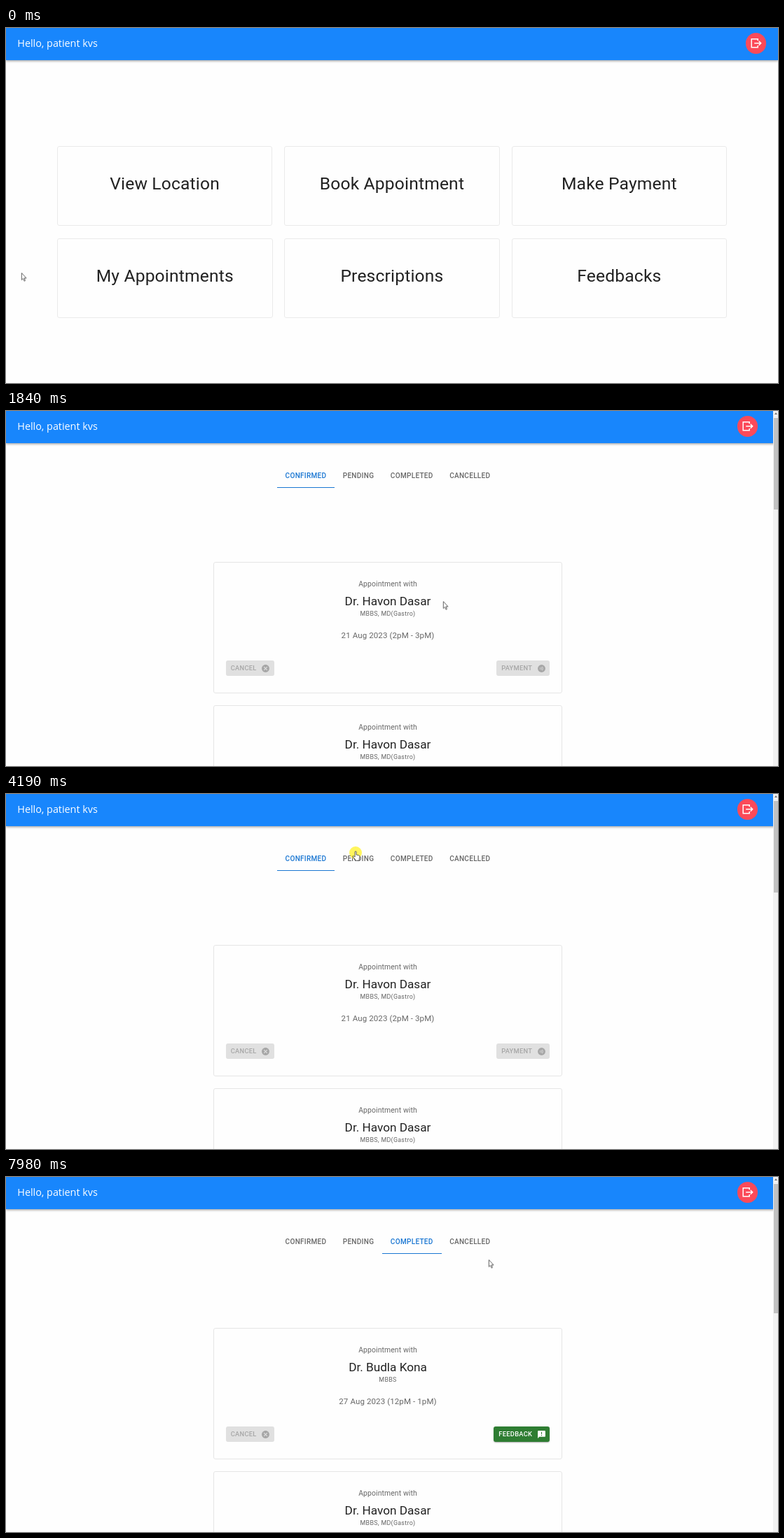
These frames come from a looping animation (1102x508 px, 8 s). An HTML page:

```html
<!DOCTYPE html>
<html lang="en">
<head>
<meta charset="utf-8">
<title>Patient portal</title>
<style>
@property --y { syntax: "<length>"; inherits: true; initial-value: 0px; }
@property --bar { syntax: "<number>"; inherits: true; initial-value: 0; }

html, body { margin: 0; width: 100%; height: 100%; overflow: hidden; }
#stage { position: relative; width: 1102px; height: 508px; overflow: hidden; background: #fefefe;
  font-family: Roboto, sans-serif; color: rgba(0,0,0,.87); }
#stage * { position: absolute; box-sizing: border-box; margin: 0; white-space: nowrap; }
.loop { animation: 8s step-end infinite; }
.fill { inset: 0; }
#stage { animation-name: scroll, bar; }
#page { transform: translateY(calc(-1 * var(--y))); }

header { width: 1102px; height: 46px; background: #1886fc; box-shadow: 0 1.5px 3px rgba(0,0,0,.35); }
header p { left: 16.3px; line-height: 44px; font: 14.35px/44px "Open Sans", sans-serif; color: #fff; }
#logout { left: 1055.8px; top: 7.3px; width: 29.4px; height: 29.4px; border-radius: 50%; background: #fb4a59;
  transform: translateX(calc(var(--bar) * -12px)); }
#logout svg { left: 0; top: 0; fill: none; stroke: #fff; stroke-width: 1.5; }

.tile { width: 307.5px; height: 114px; border: 1px solid #eaeaea; border-radius: 3px; background: #fefefe;
  font-size: 24.6px; line-height: 106px; letter-spacing: .18px; text-align: center; }

#tabs { left: 393px; top: 75px; transform: translateX(calc(var(--bar) * -6px)); }
.tab { height: 35px; overflow: hidden; text-align: center; font-size: 10.04px; font-weight: 500; line-height: 35px;
  letter-spacing: .287px; color: rgba(0,0,0,.6); }
.tab i { left: 50%; top: 50%; width: 90px; height: 90px; margin: -45px; border-radius: 50%; background: #1976d2; opacity: 0; }
#line { top: 33.6px; height: 1.4px; background: #1976d2; }

.card { height: 188px; border: 1px solid #e6e6e6; border-radius: 3px; background: #fefefe; }
.card p { left: 0; width: 100%; text-align: center; line-height: 20px; color: rgba(0,0,0,.6); }
.card .lead { top: 21.5px; font-size: 10.4px; letter-spacing: .11px; }
.card .name { top: 45px; font-size: 17.2px; color: rgba(0,0,0,.87); }
.card .degree { top: 63px; font-size: 8.9px; letter-spacing: .3px; }
.card .date { top: 94px; font-size: 11.5px; letter-spacing: .11px; }
.btn { top: 140px; height: 22.4px; padding-left: 7px; border-radius: 3px; font-size: 9.33px; font-weight: 500;
  line-height: 22px; letter-spacing: .267px; color: #fff; background: var(--bg);
  box-shadow: 0 1.5px 1px -1px rgba(0,0,0,.2), 0 1px 2px rgba(0,0,0,.25); }
.btn.off { color: #a6a6a6; box-shadow: none; }
.btn svg { right: 5.5px; top: 4.8px; width: 13px; height: 13px; fill: currentColor; }
.btn .waves { fill: none; stroke: var(--bg); stroke-width: 1.6; }

.scrollbar { right: 0; top: 0; width: 7px; height: 508px; background: #f1f1f1; }
.scrollbar b { left: 1px; right: 0; top: 9.5px; background: #c1c1c1; }
.scrollbar u { left: 2px; top: 2px; border: 2.5px solid transparent; border-top: 0; border-bottom: 3px solid #777; }

#veil { background: radial-gradient(circle 607px at 551px 254px, rgba(255,255,255,.85), rgba(238,238,238,.57) 41%, rgba(184,184,184,.38) 91%); }
.dot { top: 265.3px; width: 5px; height: 5px; border-radius: 50%;
  animation: bob 1s cubic-bezier(.37,0,.63,1) infinite alternate, near 1s cubic-bezier(.37,0,.63,1) infinite alternate; }

#cursor svg { left: 0; top: 0; overflow: visible; fill: #fff; stroke: #3a3a3a; stroke-width: .8; stroke-linejoin: round; }
#click { left: -9px; top: -7.5px; width: 18px; height: 18px; border-radius: 50%; background: rgba(255,242,40,.75); }

@keyframes scroll {
  0% { --y: 0px; }
  29.125% { --y: 0px; animation-timing-function: steps(3, jump-both); }
  31.625% { --y: 243px; }
  32.5% { --y: 243px; animation-timing-function: steps(1, jump-both); }
  33.375% { --y: 275px; }
  34.25% { --y: 275px; animation-timing-function: steps(5, jump-both); }
  38.75% { --y: 0px; }
  83.75% { --y: 0px; animation-timing-function: steps(3, jump-both); }
  86.25% { --y: 249px; }
  90.375% { --y: 249px; animation-timing-function: steps(5, jump-both); }
  94.75%, 100% { --y: 0px; }
}
@keyframes bar { 0%, 53.25% { --bar: 0; } 21.375%, 72.625%, 100% { --bar: 1; } }
@keyframes home { 0% { opacity: 1; } 13.875%, 100% { opacity: 0; } }
@keyframes visits { 0% { opacity: 0; } 13.875%, 100% { opacity: 1; } }
@keyframes veil { 0%, 21.375%, 100% { opacity: 0; } 13.875% { opacity: 1; } }
@keyframes confirmed { 0%, 53.25%, 100% { opacity: 0; } 21.375% { opacity: 1; } }
@keyframes pending { 0%, 72.625%, 100% { opacity: 0; } 53.25% { opacity: 1; } }
@keyframes completed { 0% { opacity: 0; } 72.625%, 100% { opacity: 1; } }
@keyframes tab0 { 0% { color: #1976d2; } 53.25%, 100% { color: rgba(0,0,0,.6); } }
@keyframes tab1 { 0%, 72.625%, 100% { color: rgba(0,0,0,.6); } 53.25% { color: #1976d2; } }
@keyframes tab2 { 0% { color: rgba(0,0,0,.6); } 72.625%, 100% { color: #1976d2; } }
@keyframes ripple1 {
  0%, 53.24% { opacity: 0; scale: .2; }
  53.25% { opacity: .1; scale: .2; animation-timing-function: ease-out; }
  57.5% { opacity: .1; scale: 1; animation-timing-function: linear; }
  61.875%, 100% { opacity: 0; scale: 1; }
}
@keyframes ripple2 {
  0%, 72.62% { opacity: 0; scale: .2; }
  72.625% { opacity: .1; scale: .2; animation-timing-function: ease-out; }
  76.5% { opacity: .1; scale: 1; animation-timing-function: linear; }
  80.375%, 100% { opacity: 0; scale: 1; }
}
@keyframes line {
  0% { left: 0; width: 82px; }
  53.25% { left: 0; width: 82px; animation-timing-function: steps(4, jump-both); }
  56.75% { left: 82px; width: 68px; }
  72.625% { left: 82px; width: 68px; animation-timing-function: steps(4, jump-both); }
  76.125%, 100% { left: 150px; width: 84.5px; }
}
@keyframes hover {
  0% { scale: 1; }
  7% { scale: 1; animation-timing-function: steps(3, jump-both); }
  9.5%, 100% { scale: 1.03; }
}
@keyframes move {
  0% { translate: 22px 350.5px; }
  6.125% { translate: 22px 350.5px; animation-timing-function: steps(4, jump-both); }
  9.5% { translate: 182px 357.5px; }
  20.5% { translate: 182px 357.5px; animation-timing-function: steps(3, jump-both); }
  23% { translate: 624px 272.5px; }
  41.125% { translate: 624px 272.5px; animation-timing-function: steps(4, jump-both); }
  44.625% { translate: 499px 66.5px; }
  47.125% { translate: 499px 66.5px; animation-timing-function: steps(2, jump-both); }
  48.875% { translate: 499px 82px; }
  63.5% { translate: 499px 82px; animation-timing-function: steps(5, jump-both); }
  67.625% { translate: 594px 97.5px; }
  77.875% { translate: 594px 97.5px; animation-timing-function: steps(3, jump-both); }
  80.375% { translate: 615px 325px; }
  98% { translate: 615px 325px; animation-timing-function: steps(2, jump-both); }
  99.75%, 100% { translate: 689px 118.5px; }
}
@keyframes arrow { 0%, 13.875%, 77.875%, 100% { opacity: 1; } 7%, 48% { opacity: 0; } }
@keyframes hand { 0%, 13.875%, 77.875%, 100% { opacity: 0; } 7%, 48% { opacity: 1; } }
@keyframes click { 0%, 13.875%, 55%, 74.375%, 100% { opacity: 0; } 12.125%, 52.375%, 71.75% { opacity: 1; } }
@keyframes bob { from { translate: 0 -14.6px; } to { translate: 0 14.6px; } }
@keyframes near { from { scale: .6; background: var(--far); } to { scale: 1.16; background: var(--hue); } }
</style>
</head>
<body>
<div id="stage" class="loop">
  <div id="page" class="fill">
    <div id="home" class="fill loop" style="animation-name:home"></div>
    <div id="visits" class="fill loop" style="animation-name:visits">
      <div id="tabs"><div id="line" class="loop" style="animation-name:line"></div></div>
    </div>
    <header>
      <p>Hello, patient kvs</p>
      <div id="logout"><svg width="29.4" height="29.4" viewBox="-14.7 -14.7 29.4 29.4"><path d="M2.5-3.4V-6H-6.5V6H2.5V3.4M-2.5 0H6.8M4-3 7 0 4 3"/></svg></div>
    </header>
  </div>
  <div id="veil" class="fill loop" style="animation-name:veil"></div>
  <div id="cursor" class="loop" style="animation-name:move">
    <div id="click" class="loop" style="animation-name:click"></div>
    <svg class="loop" style="animation-name:arrow" width="9" height="13"><path d="M.3 0V10L2.5 8 4 11.6 5.5 11 4 7.4H7Z"/></svg>
    <svg class="loop" style="animation-name:hand" width="9" height="15"><path d="M-.9 8V1A1 1 0 0 1 1.1 1V5L4.8 5.8Q6.2 6.3 6 8L5.2 11V13.3H-.4V11.7L-3.9 7.8Q-3.6 6.2-2.3 7Z"/></svg>
  </div>
</div>
<script>
const $ = id => document.getElementById(id);
const add = (id, html) => $(id).insertAdjacentHTML('beforeend', html);

['View Location', 'Book Appointment', 'Make Payment', 'My Appointments', 'Prescriptions', 'Feedbacks'].forEach((label, i) => {
  const hover = i === 3 ? 'animation-name:hover;' : '';
  add('home', `<div class="tile loop" style="${hover}left:${72.8 + i % 3 * 324.4}px;top:${169.3 + (i > 2) * 131.3}px">${label}</div>`);
});

[['CONFIRMED', 0, 82], ['PENDING', 82, 68], ['COMPLETED', 150, 84.5], ['CANCELLED', 234.5, 81.5]].forEach(([label, left, width], i) => {
  const ripple = i % 3 ? `<i class="loop" style="animation-name:ripple${i}"></i>` : '';
  add('tabs', `<div class="tab loop" style="animation-name:tab${i};left:${left}px;width:${width}px">${label}${ripple}</div>`);
});

const icons = {
  CANCEL: '<path d="M12 2C6.47 2 2 6.47 2 12s4.47 10 10 10 10-4.47 10-10S17.53 2 12 2zm5 13.59L15.59 17 12 13.41 8.41 17 7 15.59 10.59 12 7 8.41 8.41 7 12 10.59 15.59 7 17 8.41 13.41 12 17 15.59z"/>',
  PAYMENT: '<circle cx="12" cy="12" r="10"/><path class="waves" d="M8 10q1 2 0 4M11 8.5q2 3.5 0 7M14 7q3 5 0 10"/>',
  FEEDBACK: '<path d="M20 2H4c-1.1 0-2 .9-2 2v18l4-4h14c1.1 0 2-.9 2-2V4c0-1.1-.9-2-2-2zm-7 9h-2V5h2v6zm0 4h-2v-2h2v2z"/>'
};
const button = (label, color, place) =>
  `<div class="btn ${color ? '' : 'off'}" style="--bg:${color || '#e0e0e0'};${place}">${label}<svg viewBox="0 0 24 24">${icons[label]}</svg></div>`;

const doctors = {
  gastro: ['Dr. Havon Dasar', 'MBBS, MD(Gastro)'],
  cardio: ['Dr. Kamtesh Domri', 'MBBS, MD(Cardio)'],
  general: ['Dr. Budla Kona', 'MBBS']
};

function list(name, { left, top, width, cancel, action, color, thumb, rate }, visits) {
  const actionWidth = action === 'FEEDBACK' ? 80 : 76;
  const cards = visits.map(([doctor, date], i) => `
    <div class="card" style="left:${left}px;top:${top + i * 204.7}px;width:${width}px">
      <p class="lead">Appointment with</p>
      <p class="name">${doctors[doctor][0]}</p>
      <p class="degree">${doctors[doctor][1]}</p>
      <p class="date">${date}</p>
      ${button('CANCEL', cancel, 'left:16.7px;width:69px')}
      ${button(action, color, `right:16.7px;width:${actionWidth}px`)}
    </div>`).join('');
  add('visits', `<div class="fill loop" style="animation-name:${name}">${cards}</div>`);
  if (thumb) add('stage', `<div class="scrollbar loop" style="animation-name:${name}"><u></u>
    <b style="height:${thumb}px;transform:translateY(calc(var(--y) * ${rate}))"></b></div>`);
}

list('confirmed', { left: 296, top: 215.8, width: 498, action: 'PAYMENT', thumb: 131, rate: .241 }, [
  ['gastro', '21 Aug 2023 (2pM - 3pM)'],
  ['gastro', '23 Aug 2023 (2pM - 3pM)'],
  ['cardio', '28 Aug 2023 (3pM - 4pM)']
]);
list('pending', { left: 303, top: 244.7, width: 496, cancel: '#d32f2f', action: 'PAYMENT', color: '#1976d2' }, [
  ['cardio', '29 Aug 2023 (3pM - 4pM)']
]);
list('completed', { left: 296, top: 215.8, width: 498, action: 'FEEDBACK', color: '#2e7d32', thumb: 185, rate: .341 }, [
  ['general', '27 Aug 2023 (12pM - 1pM)'],
  ['gastro', '11 Aug 2023 (2pM - 3pM)'],
  ['cardio', '11 Aug 2023 (3pM - 4pM)']
]);

// Two strands of a turning helix, half a turn apart.
[['#d4d6da', '#85b8e2'], ['#cf9ca8', '#dd667e']].forEach(([far, hue], strand) => {
  for (let i = 0; i < 10; i++) {
    const turn = i * .2 + strand;
    add('veil', `<div class="dot" style="--far:${far};--hue:${hue};left:${517.2 + i * 7}px;animation-delay:${-turn - .15}s,${-turn - .62}s"></div>`);
  }
});
</script>
</body>
</html>
```
